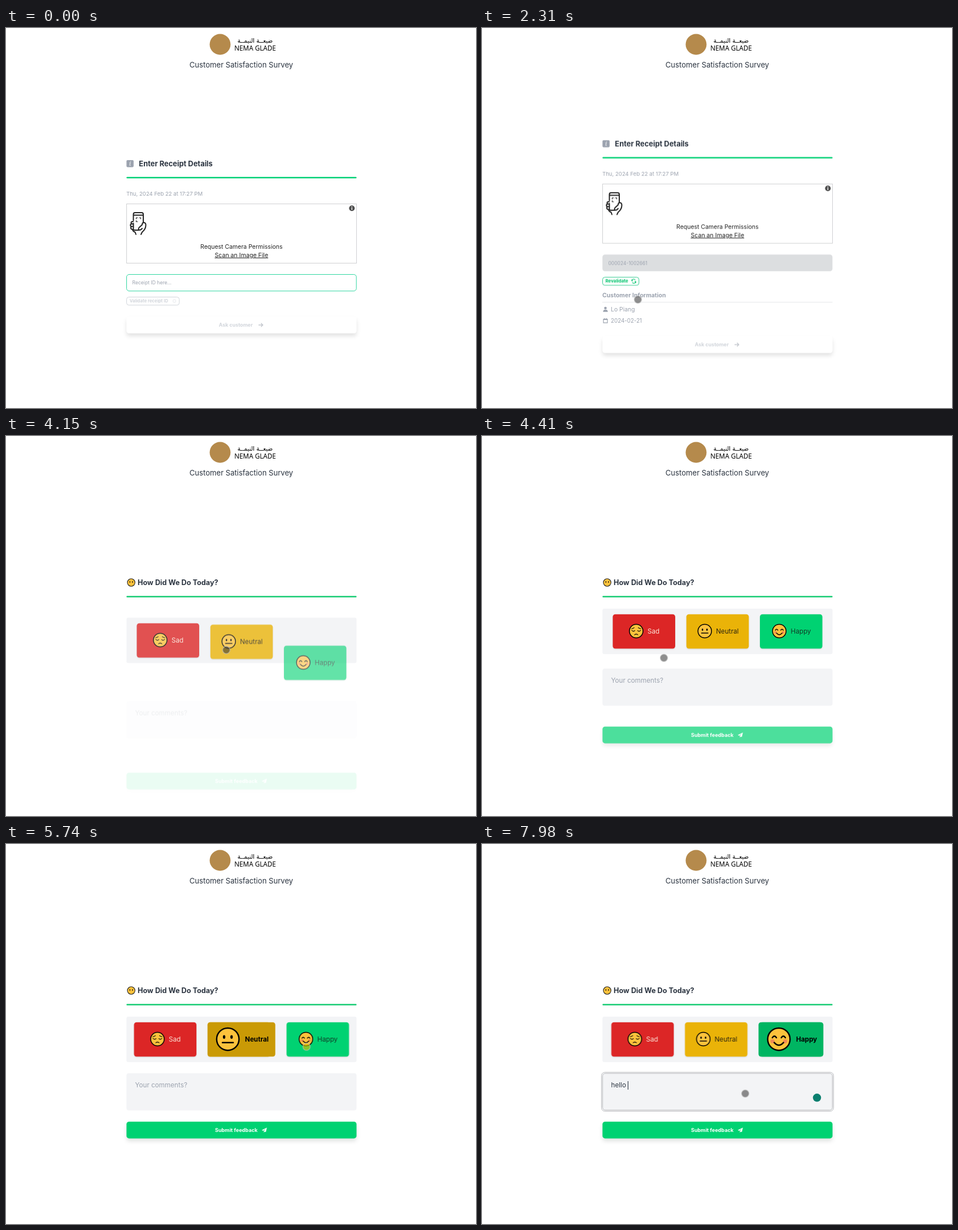
Animation of 832 by 673 pixels, one loop 8 s. Source, as an HTML page:

```html
<!DOCTYPE html>
<html lang="en">
<head>
<meta charset="utf-8">
<title>Customer Satisfaction Survey</title>
<style>
html, body { margin: 0; width: 100%; height: 100%; overflow: hidden; background: #fff; }
svg { display: block; width: 100vw; height: 100vh; }
text { font-family: Inter, sans-serif; white-space: pre; }
.b { font-weight: 700; }
.mid { text-anchor: middle; }
.grey { fill: #9ca3af; }
.pale { fill: #d1d5db; }
.dark { fill: #2b3440; }
.white { fill: #fff; }
.ink { fill: none; stroke: #000; stroke-width: 1.5; stroke-linecap: round; }
.lift { filter: drop-shadow(0 5px 3.5px rgba(0,0,0,.11)); }
.low { filter: drop-shadow(0 1px 1px rgba(0,0,0,.12)); }

/* 1% of the loop is 80 ms */
.step { animation: 8s step-end infinite; }
.flow { animation: 8s linear infinite; }

/* receipt page */
.receipt { animation-name: receipt; }
.up { animation-name: up; }
.down { animation-name: down; }
.before { animation-name: before; }
.after { animation-name: after; }
.empty { animation-name: empty; }
.focus { animation-name: focus; }
.filled { animation-name: filled; }
.open { animation-name: open; }
.locked { animation-name: locked; }
.enable { animation-name: enable; }
.ready { animation-name: ready; }
@keyframes receipt { 0% { opacity: 1 } 43.375% { opacity: 0 } }
@keyframes up { 0% { transform: none } 28.875% { transform: translateY(-35.3px) } }
@keyframes down { 0% { transform: none } 28.875% { transform: translateY(34.7px) } }
@keyframes before { 0% { opacity: 1 } 28.875% { opacity: 0 } }
@keyframes after { 0% { opacity: 0 } 28.875% { opacity: 1 } }
@keyframes empty { 0% { opacity: 1 } 13.25% { opacity: 0 } }
@keyframes focus { 0% { opacity: 0 } 9% { opacity: 1 } 22.5% { opacity: 0 } }
@keyframes filled { 0% { opacity: 0 } 13.25% { opacity: 1 } 22.5% { opacity: 0 } }
@keyframes open { 0% { opacity: 1 } 22.5% { opacity: 0 } }
@keyframes locked { 0% { opacity: 0 } 22.5% { opacity: 1 } }
@keyframes enable { 0%, 13.2% { opacity: 0 } 16.6%, 100% { opacity: 1 } }
@keyframes ready { 0%, 30% { opacity: 0 } 33%, 100% { opacity: 1 } }

/* rating page */
.slide { animation-name: slide; }
.rise { animation-name: rise; }
.rise-late { animation-name: rise-late; }
.rise-box { animation-name: rise-box; }
.rise-send { animation-name: rise-send; }
@keyframes slide {
  0%, 45.74% { transform: translateX(100px); opacity: 0 }
  45.75% { transform: translateX(98px); opacity: .1; animation-timing-function: ease-out }
  51%, 100% { transform: none; opacity: 1 }
}
@keyframes rise {
  0%, 46.9% { transform: translateY(115px); opacity: 0; animation-timing-function: cubic-bezier(.3,.5,.7,.9) }
  51.875% { transform: translateY(var(--y)); opacity: var(--o); animation-timing-function: ease-out }
  54.9%, 100% { transform: none; opacity: 1 }
}
@keyframes rise-late {
  0%, 49.5% { transform: translateY(182px); opacity: 0 }
  51.875% { transform: translateY(56px); opacity: .61; animation-timing-function: ease-out }
  54.9%, 100% { transform: none; opacity: 1 }
}
@keyframes rise-box {
  0%, 51.2% { transform: translateY(85px); opacity: 0 }
  51.875% { transform: translateY(64px); opacity: .18; animation-timing-function: cubic-bezier(.3,.5,.7,.9) }
  55.125% { transform: translateY(6px); opacity: 1; animation-timing-function: ease-out }
  57.5%, 100% { transform: none; opacity: 1 }
}
@keyframes rise-send {
  0%, 51.5% { transform: translateY(116px); opacity: 0 }
  51.875% { transform: translateY(105px); opacity: .08; animation-timing-function: cubic-bezier(.3,.5,.7,.9) }
  55.125% { transform: translateY(23px); opacity: .7; animation-timing-function: ease-out }
  58%, 100% { transform: none; opacity: 1 }
}
.shift-left { animation-name: shift-left; }
.shift-right { animation-name: shift-right; }
.pick-sad { animation-name: pick-sad; }
.pick-neutral { animation-name: pick-neutral; }
.pick-happy { animation-name: pick-happy; }
@keyframes shift-left {
  0% { transform: none } 67.5% { transform: translateX(-4.9px) } 73.375% { transform: translateX(-2.5px) }
}
@keyframes shift-right {
  0% { transform: none } 67.5% { transform: translateX(4.6px) } 73.375% { transform: none }
}
@keyframes pick-sad { 0% { opacity: 0 } 61.25% { opacity: 1 } 67.5% { opacity: 0 } }
@keyframes pick-neutral { 0% { opacity: 0 } 67.5% { opacity: 1 } 73.375% { opacity: 0 } }
@keyframes pick-happy { 0% { opacity: 0 } 73.375% { opacity: 1 } }

/* comment typing */
.hint { animation-name: hint; }
.ring { animation-name: ring; }
.k1 { animation-name: k1; }
.k2 { animation-name: k2; }
.k3 { animation-name: k3; }
.k4 { animation-name: k4; }
.k5 { animation-name: k5; }
.badge { animation-name: badge; }
.caret { animation-name: caret; }
@keyframes hint { 0% { opacity: 1 } 84.375% { opacity: 0 } }
@keyframes ring { 0% { opacity: 0 } 77.5% { opacity: 1 } }
@keyframes k1 { 0% { fill-opacity: 0 } 84.375% { fill-opacity: 1 } }
@keyframes k2 { 0% { fill-opacity: 0 } 87.75% { fill-opacity: 1 } }
@keyframes k3 { 0% { fill-opacity: 0 } 90.6% { fill-opacity: 1 } }
@keyframes k4 { 0% { fill-opacity: 0 } 92.75% { fill-opacity: 1 } }
@keyframes k5 { 0% { fill-opacity: 0 } 95.5% { fill-opacity: 1 } }
@keyframes badge { 0% { opacity: 0 } 89% { opacity: 1 } }
@keyframes caret {
  0% { transform: translateX(229px) }
  84.375% { transform: translateX(235.7px) }
  87.75% { transform: translateX(242.5px) }
  90.6% { transform: translateX(245.3px) }
  92.75% { transform: translateX(248.2px) }
  95.5% { transform: translateX(255.5px) }
  98% { transform: translateX(258px) }
}

/* pointer */
.pointer { animation: move 8s ease-in-out infinite; }
.dot { stroke: rgba(190,190,190,.6); stroke-width: 1.5; animation-name: press; }
@keyframes move {
  0%, .87% { transform: translate(411px,501px); opacity: 0 }
  .875% { transform: translate(411px,501px); opacity: 1 }
  7.25%, 19% { transform: translate(274px,445px) }
  22.5%, 30% { transform: translate(276px,481px) }
  35.75%, 38.125% { transform: translate(376px,546px) }
  41.25%, 45.75% { transform: translate(384px,559px) }
  51.875% { transform: translate(390px,379px) }
  55.125% { transform: translate(322px,393px) }
  59.5%, 62% { transform: translate(300px,362px) }
  65.125%, 68.4% { transform: translate(412px,363px) }
  71.25%, 73.375% { transform: translate(532px,359px) }
  76.75%, 100% { transform: translate(466px,442px); opacity: 1 }
}
@keyframes press {
  0%, 61.9%, 68%, 73.375%, 100% { fill: rgba(50,50,50,.55) }
  60.6%, 66.75%, 71.75% { fill: rgba(225,190,0,.6) }
}
</style>
</head>
<body>
<svg viewBox="0 0 832 673">
  <defs>
    <circle id="face" r="12" fill="#fcc23c" stroke="#000" stroke-width="1.5"/>
    <g id="sad">
      <use href="#face"/>
      <path class="ink" style="stroke-width:1.1" d="M-8-1.5q2.8 3.4 5.6.6M8-1.5q-2.8 3.4-5.6.6M-8.2-4.2q2.6-.3 4.6-2M8.2-4.2q-2.6-.3-4.6-2M-3 6.6q3-2.4 6 0"/>
    </g>
    <g id="neutral">
      <use href="#face"/>
      <ellipse cx="-4" cy="-2.4" rx="1.3" ry="2"/><ellipse cx="4" cy="-2.4" rx="1.3" ry="2"/>
      <path class="ink" d="M-5.8 3.6H5.8"/>
    </g>
    <g id="happy">
      <use href="#face"/>
      <circle cx="-6.8" cy="2.2" r="2.2" fill="#f28a55"/><circle cx="6.8" cy="2.2" r="2.2" fill="#f28a55"/>
      <path class="ink" d="M-7-1.6q2.2-3.4 4.4 0M7-1.6q-2.2-3.4-4.4 0M-5 3.6q5 5.6 10 0"/>
    </g>
    <path id="arrow" d="M-4 0H3.4M.4-3.2L3.6 0 .4 3.2" fill="none" stroke-width="1.5"/>
    <path id="reload" d="M-3.4-.8A3.2 3.2 0 0 1 2.6-2M3.4.8A3.2 3.2 0 0 1-2.6 2M-3.6-3v2.3h2.2M3.6 3V.7H1.4" fill="none" stroke-width="1.1"/>
  </defs>

  <!-- header -->
  <circle cx="379" cy="29" r="18.5" fill="#b58a4c"/>
  <text class="mid" x="441" y="25.5" style="font:10.5px 'DejaVu Sans',sans-serif">ضيعــة النيمــة</text>
  <text class="mid" x="441" y="40" style="font:500 11.7px 'Noto Sans',sans-serif">NEMA GLADE</text>
  <text class="mid dark" x="416.5" y="70" font-size="13.1">Customer Satisfaction Survey</text>

  <!-- receipt page -->
  <g class="step receipt">
    <g class="step up">
      <rect class="grey" x="213.3" y="234" width="12.6" height="12.4" rx="1.8"/>
      <text class="mid white" x="219.6" y="243.7" style="font:italic 10px 'Noto Serif',serif">i</text>
      <text class="b dark" x="235.3" y="244.7" font-size="12.9">Enter Receipt Details</text>
      <rect x="213.3" y="263.7" width="407.2" height="2.5" rx="1" fill="#00d074"/>
      <text class="grey" x="213" y="297" font-size="9.6">Thu, 2024 Feb 22 at 17:27 PM</text>

      <rect x="213.5" y="311.5" width="407" height="105" fill="#fff" stroke="#cfd0d2"/>
      <circle cx="612.3" cy="319.3" r="5" fill="#4f4f4f"/>
      <path d="M612.3 318.6v3.4M612.3 316v1.4" stroke="#fff" stroke-width="1.5"/>
      <g fill="none" stroke="#222" stroke-width="2" stroke-linecap="round" stroke-linejoin="round">
        <path d="M225.5 341V330q0-3 3-3h11.500q3 0 3 3v14.500M225.500 331.500h17.500M225.500 346v10q0 2 2 2h7.500"/>
        <path d="M225 343h-1.500q-2 0-2 2t2 2h1.500M224 347h-1.500q-2.200 0-2.200 2.200t2.200 2.200h2M223 351.500q-2.500.5-2 3 .5 2 3.500 2.500M224 357.500q1 3 4.500 4l1.500 4M239 365.500l2-4q6.500-5 6.500-12.500 0-4-3.500-4.500-3 0-3 4l-5.500 5q-2 2.500 0 4 2 1 4-1l1.500-1.500"/>
        <path stroke-width="1.2" d="M230.500 338v-2h2.500M238.500 338v-2H236M230.500 341v2h2.500"/>
      </g>
      <text class="mid" x="416.8" y="390.7" font-size="10.5" fill="#222">Request Camera Permissions</text>
      <text class="mid" x="416.8" y="405.7" font-size="10.6" fill="#222" text-decoration="underline">Scan an Image File</text>

      <g class="step open">
        <rect class="step focus" x="212.4" y="435.4" width="409" height="31.4" rx="6" fill="none" stroke="#10cf8e" stroke-width="2"/>
        <rect x="213.5" y="436.5" width="406.7" height="29.3" rx="4.5" fill="#fff" stroke="#2ed6a0"/>
        <text class="step empty grey" x="223.5" y="454" font-size="8.6">Receipt ID here...</text>
        <text class="step filled dark" x="223.5" y="454" font-size="8.5">000024-1002661</text>
      </g>
      <g class="step locked">
        <rect x="213.2" y="436.5" width="407.2" height="29.6" rx="4.5" fill="#dcdee0"/>
        <text class="grey" x="223.5" y="454.5" font-size="8.5">000024-1002661</text>
      </g>

      <g class="step before">
        <rect x="213.5" y="476.5" width="93.2" height="14.3" rx="4" fill="#fff" stroke="#d1d5db"/>
        <text class="b pale" x="218.7" y="486.4" font-size="7.7">Validate receipt ID</text>
        <rect x="295.8" y="481.2" width="4.6" height="4.6" rx="1" fill="none" stroke="#e5e7eb"/>
        <g class="flow enable">
          <rect x="213.5" y="476.5" width="93.2" height="14.3" rx="4" fill="#fff" stroke="#10b981"/>
          <text class="b" x="218.7" y="486.4" font-size="7.7" fill="#00c46c">Validate receipt ID</text>
          <rect x="295.8" y="481.2" width="4.6" height="4.6" rx="1" fill="none" stroke="#00c46c"/>
        </g>
      </g>
      <g class="step after">
        <rect x="213.5" y="476.7" width="64.3" height="14.2" rx="4" fill="#fff" stroke="#35cb90"/>
        <text class="b" x="218.5" y="486.4" font-size="7.9" fill="#00c46c">Revalidate</text>
        <use href="#reload" x="268.7" y="483.7" stroke="#00c46c"/>
      </g>
    </g>

    <g class="step after">
      <text class="b grey" x="213" y="476.5" font-size="10.5">Customer Information</text>
      <path d="M213 485.7h407.5" stroke="#e5e7eb"/>
      <circle class="grey" cx="218.5" cy="496" r="2.3"/>
      <path class="grey" d="M214.3 502.8q0-4 4.2-4t4.2 4z"/>
      <text class="grey" x="228" y="502" font-size="10.4">Lo Piang</text>
      <path d="M215 515.5h7v6.6h-7zM215 516.5h7M216.8 513.8v1.5M220.2 513.8v1.5" fill="none" stroke="#9ca3af" stroke-width="1.2"/>
      <text class="grey" x="228" y="522" font-size="9.8">2024-02-21</text>
    </g>

    <g class="step down">
      <rect class="lift white" x="213.3" y="511.3" width="407.2" height="29.5" rx="4.5"/>
      <text class="b pale" x="376.7" y="529" font-size="8.9">Ask customer</text>
      <use href="#arrow" x="451" y="526" stroke="#c5c9cf"/>
      <g class="flow ready">
        <rect x="213.3" y="511.3" width="407.2" height="29.5" rx="4.5" fill="#00d272"/>
        <text class="b white" x="376.7" y="529" font-size="8.9">Ask customer</text>
        <use href="#arrow" x="451" y="526" stroke="#fff"/>
      </g>
    </g>
  </g>

  <!-- rating page -->
  <g class="flow slide">
    <g transform="translate(221.6 259.5)">
      <circle r="6.7" fill="#fcc23c" stroke="#222" stroke-width="1.1"/>
      <ellipse cx="-2.3" cy="-1" rx=".8" ry="1.2"/><ellipse cx="2.3" cy="-1" rx=".8" ry="1.2"/>
    </g>
    <text class="b dark" x="233" y="263.9" font-size="12.7">How Did We Do Today?</text>
    <rect x="213.3" y="283.2" width="407.2" height="2.5" rx="1" fill="#14cb72"/>
  </g>

  <rect class="flow rise" style="--y:16px;--o:.95" x="213.3" y="305.7" width="407.2" height="80.5" rx="3" fill="#f3f4f6"/>
  <g class="flow rise" style="--y:16px;--o:.79">
    <g class="step shift-left">
      <rect class="low" x="231.5" y="315.7" width="110.5" height="60.8" rx="4.5" fill="#dc2626"/>
      <use href="#sad" x="273" y="345.5"/>
      <text x="293" y="350" font-size="11.7" fill="#fbe3d6">Sad</text>
    </g>
    <g class="step pick-sad">
      <rect x="231.5" y="315.7" width="110.5" height="60.8" rx="4.5" fill="#b91c1c"/>
      <use href="#sad" transform="translate(270.5 345.7) scale(1.65)"/>
      <text class="b" x="301" y="350" font-size="11.7" fill="#fbe3d6">Sad</text>
    </g>
  </g>
  <g class="flow rise" style="--y:18.5px;--o:.79">
    <g class="step shift-left">
      <rect class="low" x="361.8" y="315.7" width="110.5" height="60.8" rx="4.5" fill="#eab308"/>
      <use href="#neutral" x="394.3" y="345.5"/>
      <text x="414.3" y="350" font-size="11.7" fill="#2b2410">Neutral</text>
    </g>
    <g class="step pick-neutral">
      <rect x="356.9" y="315.7" width="119.8" height="60.8" rx="4.5" fill="#ca9a06"/>
      <use href="#neutral" transform="translate(392.7 345.7) scale(1.65)"/>
      <text class="b" x="423" y="350" font-size="11.7">Neutral</text>
    </g>
  </g>
  <g class="flow rise-late">
    <g class="step shift-right">
      <rect class="low" x="492" y="315.7" width="110.5" height="60.8" rx="4.5" fill="#00d272"/>
      <use href="#happy" x="526.3" y="345.5"/>
      <text x="546.5" y="350" font-size="11.7" fill="#123c28">Happy</text>
    </g>
    <g class="step pick-happy">
      <rect x="489.5" y="315.7" width="114.8" height="60.8" rx="4.5" fill="#00b562"/>
      <use href="#happy" transform="translate(525.5 345.7) scale(1.65)"/>
      <text class="b" x="556" y="350" font-size="11.7">Happy</text>
    </g>
  </g>

  <g class="flow rise-box">
    <rect x="213.3" y="406" width="407.2" height="65.7" rx="4" fill="#f3f4f6"/>
    <text class="step hint grey" x="228.5" y="431.3" font-size="11.7">Your comments?</text>
    <g class="step ring">
      <rect x="212.5" y="405.2" width="408.8" height="67.2" rx="5" fill="none" stroke="#fff" stroke-width="2"/>
      <rect x="211.5" y="404.3" width="410.8" height="69" rx="6" fill="none" stroke="#b4b6ba"/>
      <rect x="213.5" y="406.3" width="406.8" height="65" rx="4.5" fill="none" stroke="#b4b6ba"/>
      <rect class="step caret" y="420" width="1" height="15" fill="#1f2937"/>
    </g>
    <text class="dark" x="228.5" y="431.3" font-size="11.7"><tspan class="step k1">h</tspan><tspan class="step k2">e</tspan><tspan class="step k3">l</tspan><tspan class="step k4">l</tspan><tspan class="step k5">o</tspan></text>
    <circle class="step badge" cx="593" cy="449.3" r="7.2" fill="#0b7f6f"/>
  </g>

  <g class="flow rise-send">
    <rect class="lift" x="213.3" y="491.8" width="407.2" height="29.6" rx="4.5" fill="#00d272"/>
    <text class="b white" x="370" y="509.7" font-size="9.1">Submit feedback</text>
    <path class="white" d="M461.8 502.2l-9 4.6 2.7 1.2 4.3-4-3.3 4.5v2.7l1.5-1.9 2 .9z"/>
  </g>

  <g class="pointer"><circle class="step dot" r="6.5"/></g>
</svg>
</body>
</html>
```
